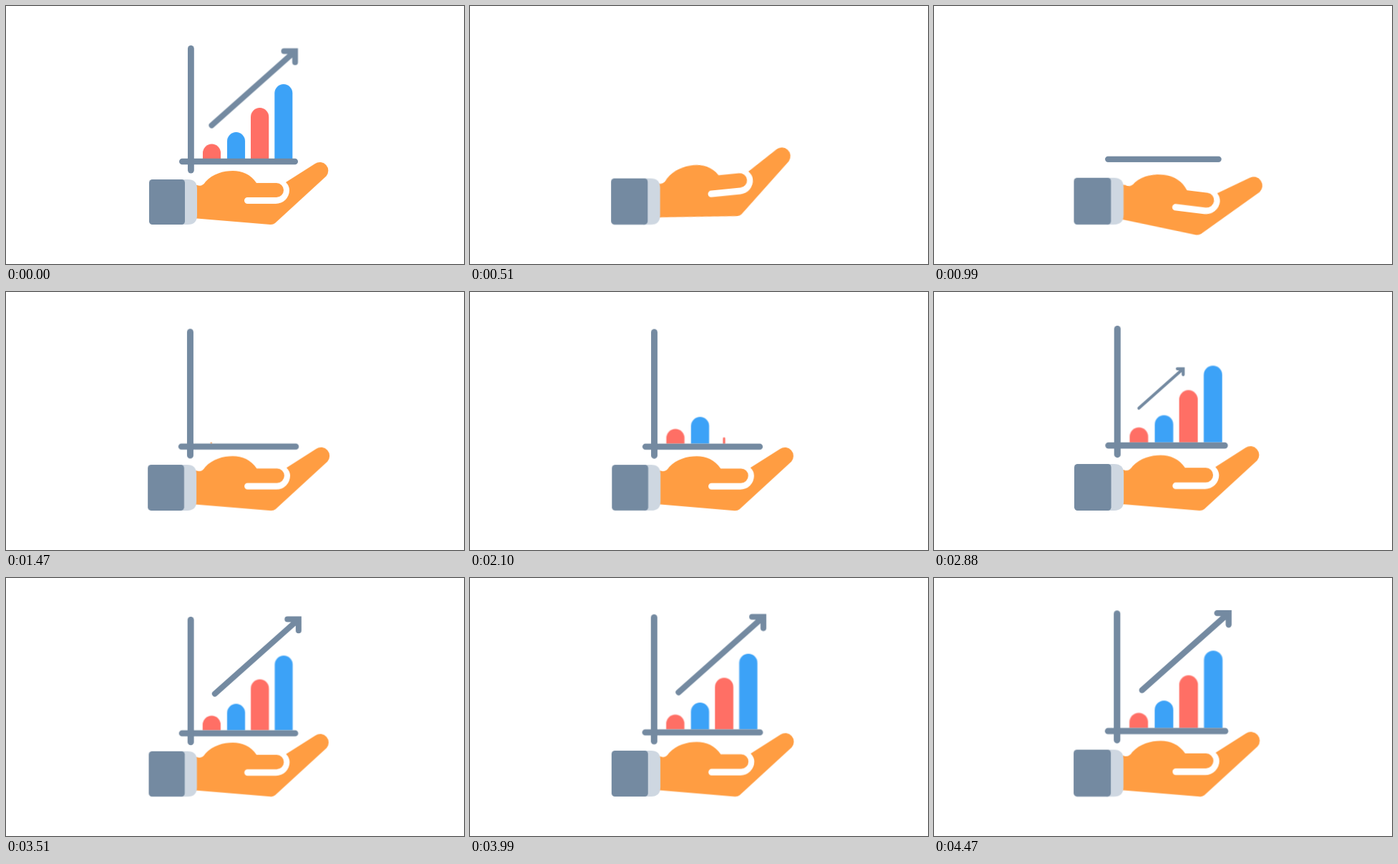
An HTML page without scripts for the animation above (4.5 s loop, 640 px wide and 360 px high).

```html
<!DOCTYPE html>
<html lang="en">
<head>
<meta charset="utf-8">
<title>Growth in hand</title>
<style>
  html, body { margin: 0; width: 100%; height: 100%; overflow: hidden; background: #fff; }
  svg { display: block; width: 100%; height: 100%; }

  .slate { fill: #748aa1; }
  .red { fill: #ff6f65; }
  .blue { fill: #3ca2f7; }
  .skin { fill: #ff9d42; }
  .cuff { fill: #ced7e1; }

  .icon, .hand, .part, .arrow { animation: 4.5s linear infinite; }
  .icon { transform-origin: 325.5px 305px; animation-name: pulse; }
  .hand { transform-origin: 254px 273.5px; animation-name: swing; }
  .part { transform-box: fill-box; transform-origin: 50% 100%; }
  .x-axis { transform-origin: 0 50%; animation-name: x-axis; }
  .y-axis { animation-name: y-axis; }
  .bar1 { animation-name: bar1, tint; }
  .bar2 { animation-name: bar2; }
  .bar3 { animation-name: bar3; }
  .bar4 { animation-name: bar4; }
  .arrow {
    fill: none; stroke: #748aa1; stroke-width: 8; stroke-linecap: round;
    transform-origin: 292px 162px; animation-name: arrow;
  }

  @keyframes pulse {
    0%, 40%, 80% { transform: scale(1); }
    20%, 60%, 100% { transform: scale(1.04); }
  }
  @keyframes swing {
    0%, 26.5%, 100% { transform: rotate(0deg); }
    9.1% { transform: rotate(-9.5deg); }
    20.4% { transform: rotate(9.5deg); }
  }

  /* Each part shows for one tick, clears, then grows in turn. */
  @keyframes x-axis {
    0% { transform: scale(1); animation-timing-function: step-end; }
    .6%, 13.6% { transform: scale(0); }
    22.5%, 100% { transform: scale(1); }
  }
  @keyframes y-axis {
    0% { transform: scale(1); animation-timing-function: step-end; }
    .6%, 22.5% { transform: scale(0); }
    32%, 100% { transform: scale(1); }
  }
  @keyframes bar1 {
    0% { transform: scale(1); animation-timing-function: step-end; }
    .6%, 32% { transform: scale(0); }
    38.9%, 100% { transform: scale(1); }
  }
  @keyframes bar2 {
    0% { transform: scale(1); animation-timing-function: step-end; }
    .6%, 38.9% { transform: scale(0); }
    45.8%, 100% { transform: scale(1); }
  }
  @keyframes bar3 {
    0% { transform: scale(1); animation-timing-function: step-end; }
    .6%, 45.8% { transform: scale(0); }
    52.8%, 100% { transform: scale(1); }
  }
  @keyframes bar4 {
    0% { transform: scale(1); animation-timing-function: step-end; }
    .6%, 52.8% { transform: scale(0); }
    59.8%, 100% { transform: scale(1); }
  }
  @keyframes arrow {
    0% { transform: translate(-4.5px, 4.5px) scale(1); animation-timing-function: step-end; }
    .6%, 59.8% { transform: translate(-4.5px, 4.5px) scale(0); }
    68% { transform: translate(-4.5px, 4.5px) scale(1); }
    76%, 100% { transform: translate(0, 0) scale(1); }
  }
  @keyframes tint {
    0% { fill: #ff6f65; animation-timing-function: step-end; }
    .6%, 38.3% { fill: #f2a060; }
    39%, 100% { fill: #ff6f65; }
  }
</style>
</head>
<body>
<svg viewBox="0 0 640 360">
  <defs>
    <clipPath id="aboveAxis"><path d="M0 0H640V214H0Z"/></clipPath>
  </defs>
  <g class="icon">
    <path class="hand skin" d="M260 250H267Q274 253 279 245C289 234 304 230 317 230S342 235 350 247H378A10 10 0 0 1 378 267H337.5A4.5 4.5 0 0 0 337.5 276H377A19 19 0 0 0 396 257Q396 251 391 246L432 220A11.8 11.8 0 0 1 447.5 237.5L376 303Q373 305.5 369 305L267 296.5H260Z"/>
    <path class="cuff" d="M244 242H254Q267 242 267 255V292Q267 305 254 305H244Z"/>
    <rect class="slate" x="200" y="242" width="50" height="63" rx="4.5"/>

    <g clip-path="url(#aboveAxis)">
      <path class="part bar1 red" d="M275 213V205A12.5 12.5 0 0 1 300 205V213Z"/>
      <path class="part bar2 blue" d="M309 213V188.5A12.5 12.5 0 0 1 334 188.5V213Z"/>
      <path class="part bar3 red" d="M342 213V154.7A12.6 12.6 0 0 1 367.2 154.7V213Z"/>
      <path class="part bar4 blue" d="M375.3 213V121.5A12.5 12.5 0 0 1 400.3 121.5V213Z"/>
    </g>
    <rect class="part x-axis slate" x="242" y="212.7" width="166" height="8.5" rx="4.25"/>
    <rect class="part y-axis slate" x="254" y="55" width="8.8" height="178.5" rx="4.4"/>
    <path class="arrow" d="M292 162L408 59M393 58.5H408.5V74"/>
  </g>
</svg>
</body>
</html>
```
